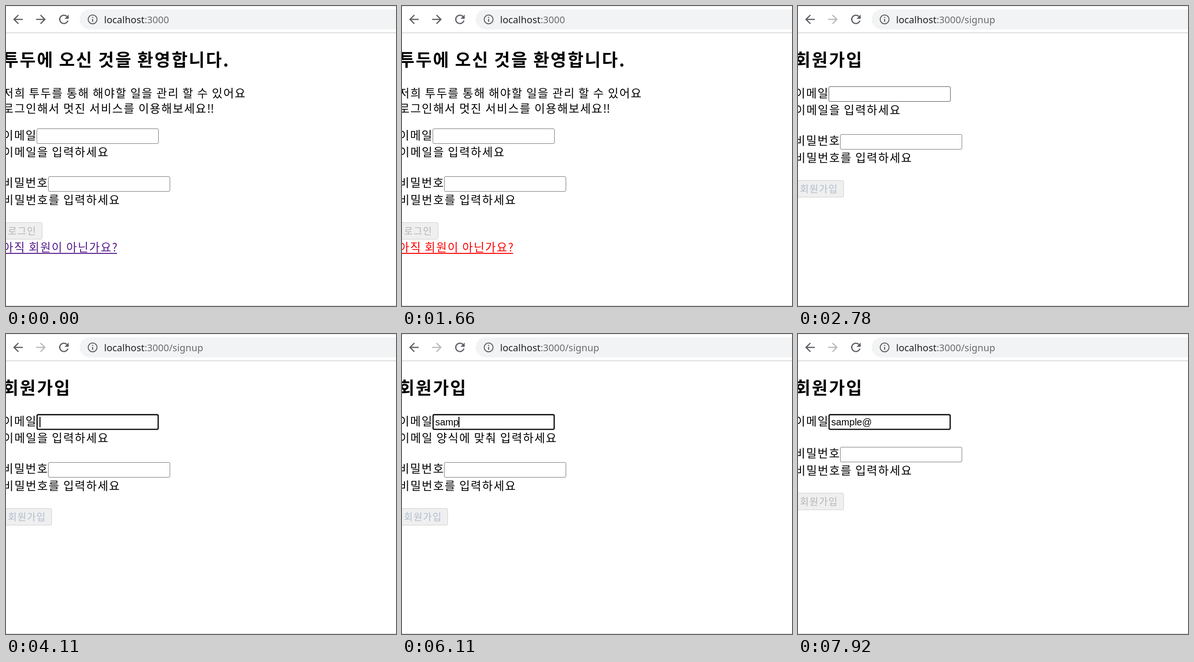
These frames come from a looping animation (815x627 px, 8000 ms). An HTML page:

```html
<!DOCTYPE html>
<html lang="ko">
<head>
<meta charset="utf-8">
<title>회원가입</title>
<style>
html, body { margin: 0; height: 100%; overflow: hidden; background: #fff; }
svg { display: block; }
text { font: 24px "Noto Sans CJK KR", "Noto Sans CJK", "Noto Sans", sans-serif; letter-spacing: .075em; word-spacing: -.07em; }
.title { font-size: 36px; font-weight: 700; }
.label { font-size: 20px; }
.marks { letter-spacing: -.02em; }
.url { font: 20px "Noto Sans", sans-serif; letter-spacing: 0; fill: #6b6b6b; }
.typed { font: 20px "Liberation Sans", Arial, sans-serif; letter-spacing: 0; }
.icon { fill: none; stroke: #5f6066; stroke-width: 2; }
.field { fill: #fff; stroke: #767676; }
.hover { stroke: #4f4f4f; }
.focus { stroke: #101010; stroke-width: 2.6; }
</style>
</head>
<body>
<svg width="815" height="627" viewBox="0 0 815 627">
  <path d="M0 .5H815" stroke="#e1e2e4"/>
  <path d="M0 56H815" stroke="#dadcdf" stroke-width="2"/>
  <path d="M0 626.5H815" stroke="#c8c8c8"/>
  <rect x="154" y="7" width="700" height="42" rx="21" fill="#f1f3f4"/>

  <g class="icon">
    <path d="M20 12H5M12.7 4.7 5.4 12l7.3 7.3" transform="translate(10 13) scale(1.25)"/>
    <path id="forward" d="M20 12H5M12.7 4.7 5.4 12l7.3 7.3" transform="translate(88 13) scale(-1.25 1.25)"/>
    <g transform="translate(106 13) scale(1.25)">
      <path d="M17 7A7 7 0 1 0 18.7 14"/>
      <path d="M20 4v7h-7z" fill="#5f6066" stroke="none"/>
    </g>
    <circle cx="181" cy="28" r="9.3"/>
    <path d="M181 27v6M181 22.8v2.2" stroke-width="2.2"/>
  </g>
  <text class="url" x="205" y="36"><tspan fill="#202124">localhost</tspan>:3000<tspan id="path"></tspan></text>

  <text id="title" class="title" x="-7" y="125.5"></text>
  <g id="intro">
    <text x="-6.5" y="190.5">저희 투두를 통해 해야할 일을 관리 할 수 있어요</text>
    <text x="-6.5" y="222.5">로그인해서 멋진 서비스를 이용해보세요<tspan class="marks">!!</tspan></text>
    <g id="link">
      <text x="-7" y="513">아직 회원이 아닌가요?</text>
      <rect y="516" width="232" height="2"/>
    </g>
  </g>

  <g id="email">
    <text x="-7" y="191">이메일</text>
    <rect id="emailField" rx="2.5"/>
    <text id="typed" class="typed" x="69.5" y="191"></text>
    <rect id="caret" y="173" width="2" height="22"/>
    <text id="hint" x="-6.5" y="225.5"></text>
  </g>
  <g id="rest">
    <text x="-7" y="290">비밀번호</text>
    <rect id="passField" x="88.5" y="268.5" width="254" height="31" rx="2.5"/>
    <text x="-6.5" y="325.5">비밀번호를 입력하세요</text>
    <rect id="button" x="-8.5" y="364.5" height="35" rx="3" fill="#efefef" stroke="#cfcfcf"/>
    <text id="action" class="label" x="4" y="390"></text>
  </g>
</svg>
<script>
const $ = id => document.getElementById(id);
const set = (id, attrs) => {
  for (const key in attrs) $(id).setAttribute(key, attrs[key]);
};
const within = (t, from, to) => t >= from && t < to;
const show = (id, on) => set(id, { visibility: on ? "visible" : "hidden" });

const LOOP = 8000, SIGNUP = 1720, ROUTED = 1790, FOCUS = 3120;
const WORD = "sample@";
const KEYS = [5120, 5520, 5780, 6110, 6380, 6510, 7370];
const CARET = [[FOCUS, 3650], [4110, 4660], [5120, 7040], [7370, 7920]];

function draw(t) {
  const signup = t >= SIGNUP, routed = t >= ROUTED, focused = t >= FOCUS;
  const count = KEYS.filter(k => t >= k).length;
  const valid = count === WORD.length;

  // Browser bar
  $("path").textContent = routed ? "/signup" : "";
  set("forward", { stroke: routed ? "#b9babd" : "#5f6066" });

  // Page content
  $("title").textContent = signup ? "회원가입" : "투두에 오신 것을 환영합니다.";
  show("intro", !signup);
  set("link", { fill: t >= 1660 ? "#f00" : "#551a8b" });

  const shift = signup ? 0 : 88;
  set("email", { transform: `translate(0 ${shift})` });
  set("rest", { transform: `translate(0 ${valid ? -32 : shift})` });

  // Fields
  set("emailField", focused
    ? { x: 65, y: 168.6, width: 253, height: 30.6, class: "field focus" }
    : { x: 64.5, y: 168.5, width: 254, height: 31, class: within(t, 2780, FOCUS) ? "field hover" : "field" });
  set("passField", { class: within(t, 790, 860) ? "field hover" : "field" });

  $("typed").textContent = WORD.slice(0, count);
  const width = count ? $("typed").getComputedTextLength() : 0;
  set("caret", { x: Math.max(70, Math.floor(69.5 + width)) });
  show("caret", CARET.some(([from, to]) => within(t, from, to)));

  $("hint").textContent = valid ? "" : count ? "이메일 양식에 맞춰 입력하세요" : "이메일을 입력하세요";

  // Button
  $("action").textContent = signup ? "회원가입" : "로그인";
  set("action", { fill: signup && !valid ? "#afbdd0" : "#b3b5b8" });
  set("button", { width: signup ? 104 : 84 });
}

const start = performance.now();
function tick() {
  draw((performance.now() - start) % LOOP);
  requestAnimationFrame(tick);
}
tick();
</script>
</body>
</html>
```
